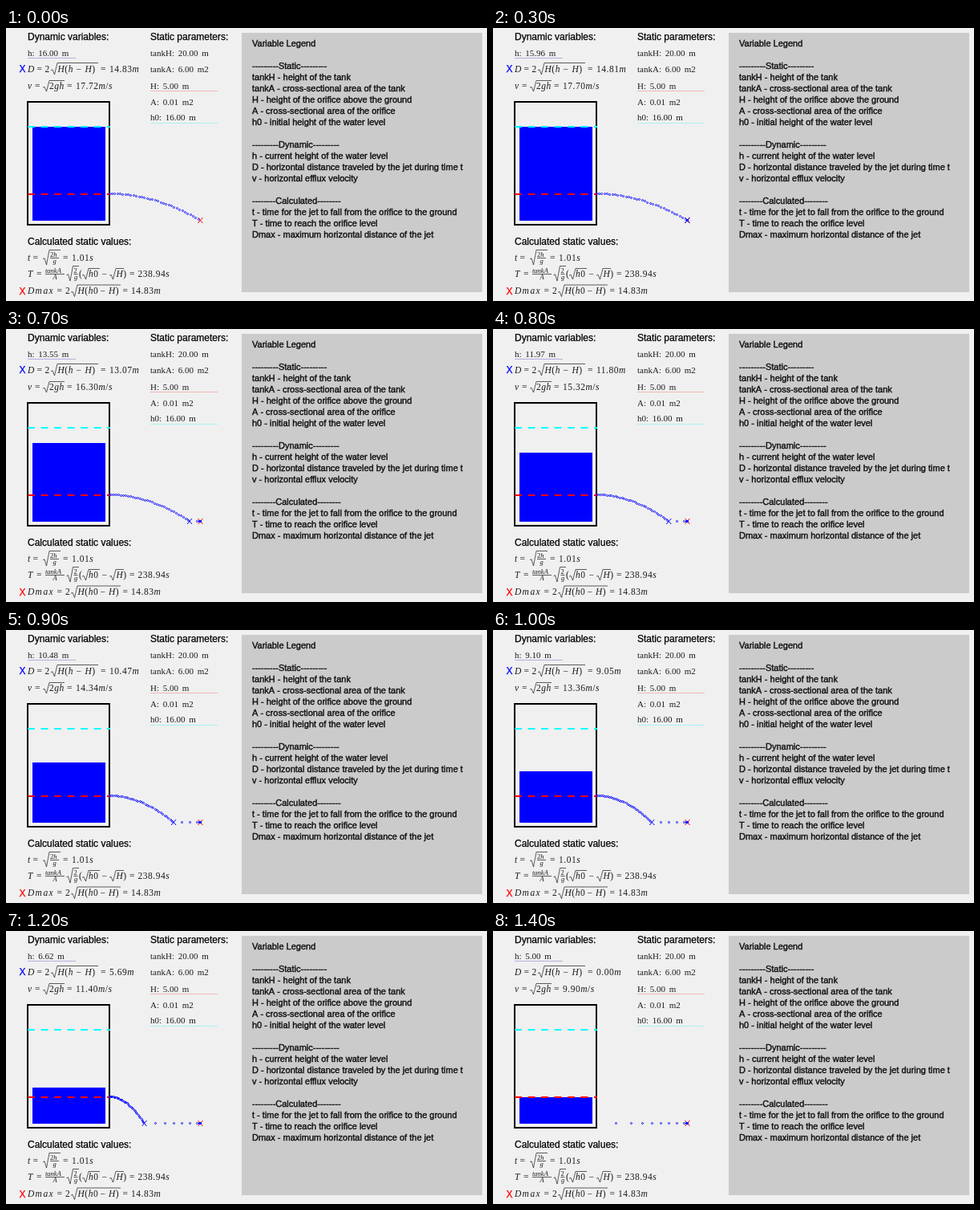
Animation of 600 by 340 pixels, one loop 1.6 s. Source, as an HTML page with a canvas:

```html
<!DOCTYPE html>
<html lang="en">
<head>
<meta charset="utf-8">
<title>Draining tank</title>
<style>
  html, body { margin: 0; width: 100%; height: 100%; overflow: hidden; background: #f0f0f0; }
  canvas { display: block; }
</style>
</head>
<body>
<canvas id="stage" width="600" height="340"></canvas>
<script>
const ctx = document.getElementById('stage').getContext('2d');
const SANS = '"Liberation Sans", Arial, sans-serif';
const SERIF = '"Liberation Serif", "Times New Roman", serif';
const BLUE = '#00f', RED = '#f00', CYAN = '#0ff', INK = '#1c1c1c';

// Physics, in metres and seconds
const G = 9.81, H = 5, H0 = 16, DRAIN_TIME = 238.94;
const STEP = 100, STEPS = 16, LAST = 14;
const drainRate = (Math.sqrt(H0) - Math.sqrt(H)) / DRAIN_TIME;
const FALL_TIME = Math.sqrt(2 * H / G);

// Stage geometry, in pixels
const SCALE = 7.65, GROUND = 245, FLOOR = 239.5, WALL = 129;
const levelY = h => Math.ceil(GROUND - h * SCALE);
const landingX = h => WALL + reach(h) * SCALE;

const LEGEND = `Variable Legend

---------Static---------
tankH - height of the tank
tankA - cross-sectional area of the tank
H - height of the orifice above the ground
A - cross-sectional area of the orifice
h0 - initial height of the water level

---------Dynamic---------
h - current height of the water level
D - horizontal distance traveled by the jet during time t
v - horizontal efflux velocity

--------Calculated--------
t - time for the jet to fall from the orifice to the ground
T - time to reach the orifice level
Dmax - maximum horizontal distance of the jet`.split('\n');

function elapsed(step) {
  if (step < 3) return 0;
  if (step < 6) return step - 2.34;
  return Math.min(DRAIN_TIME, 13.27 + 30 * (step - 6));
}

function level(step) {
  return (Math.sqrt(H0) - drainRate * elapsed(step)) ** 2;
}

function reach(h) {
  return 2 * Math.sqrt(H * Math.max(0, h - H));
}

function text(x, y, str, font, { color = INK, letter = 0, word = 0, weight = 0 } = {}) {
  ctx.font = font;
  ctx.letterSpacing = letter + 'px';
  ctx.wordSpacing = word + 'px';
  ctx.fillStyle = ctx.strokeStyle = color;
  ctx.fillText(str, x, y);
  if (!weight) return;
  ctx.lineWidth = weight;
  ctx.strokeText(str, x, y);
}

const sans = (x, y, str, color = '#000') => text(x, y, str, '12px ' + SANS, { color, weight: 0.25 });
const roman = (x, y, str) => text(x, y, str, '11px ' + SERIF, { word: 2 });

// Letters in italics, everything else upright
function math(x, y, str, size = 11.5, letter = 0.5) {
  for (const run of str.match(/[a-z]+|[^a-z]+/gi)) {
    text(x, y, run, `${/[a-z]/i.test(run) ? 'italic ' : ''}${size}px ${SERIF}`, { letter });
    x += ctx.measureText(run).width;
  }
}

function equation(y, ...parts) {
  for (let i = 0; i < parts.length; i += 2) math(parts[i], y, parts[i + 1]);
}

function line(color, width, ...points) {
  ctx.strokeStyle = color;
  ctx.lineWidth = width;
  ctx.beginPath();
  for (let i = 0; i < points.length; i += 2) ctx.lineTo(points[i], points[i + 1]);
  ctx.stroke();
}

function root(x, right, top, bottom) {
  const mid = (top + bottom) / 2 + 1;
  line(INK, 0.7, x, mid + 1, x + 2, mid, x + 4.5, bottom, x + 8, top, right, top);
}

function fraction(x, right, y, upper, lower, lowerX) {
  math(x, y - 1.5, upper, 8.5, 0);
  line(INK, 0.7, x, y + 0.5, right, y + 0.5);
  math(lowerX, y + 7, lower, 8.5, 0);
}

function cross(x, color) {
  line(color, 1, x - 3, FLOOR - 3.5, x + 3, FLOOR + 3.5);
  line(color, 1, x + 3, FLOOR - 3.5, x - 3, FLOOR + 3.5);
}

// Small ring on the pixel grid
function dot(x, y) {
  ctx.strokeStyle = BLUE;
  ctx.lineWidth = 1;
  ctx.beginPath();
  ctx.arc(Math.floor(x) + 0.5, Math.floor(y) + 0.5, 1, 0, 7);
  ctx.stroke();
}

function dashed(y, color) {
  ctx.setLineDash([9, 7.5]);
  line(color, 2, 27, y, 130, y);
  ctx.setLineDash([]);
}

function drawLabels(h, flowing) {
  sans(27, 15, 'Dynamic variables:');
  roman(27, 34.5, `h: ${h.toFixed(2)} m`);
  line('#b0b0e0', 1, 27, 37.5, 87, 37.5);
  if (flowing) sans(16.5, 55, 'X', BLUE);
  equation(54.5, 27, 'D', 38.5, '=', 48.5, '2', 64.5, 'H(h', 87.5, '−', 98.5, 'H)',
    118, '=', 129, reach(h).toFixed(2) + 'm');
  root(56, 115, 43.5, 58);
  equation(75.5, 27, 'v', 36, '=', 54, '2gh', 76, '=', 87, Math.sqrt(2 * G * h).toFixed(2) + 'm/s');
  root(46, 73, 65.5, 79);

  sans(180, 15, 'Static parameters:');
  roman(180, 34.5, 'tankH: 20.00 m');
  roman(180, 54.5, 'tankA: 6.00 m2');
  roman(180, 75.5, 'H: 5.00 m');
  roman(180, 95.5, 'A: 0.01 m2');
  roman(180, 115, 'h0: 16.00 m');
  line('#f4b4b4', 1, 180, 78.5, 264, 78.5);
  line('#a8f2f2', 1, 180, 118.5, 264, 118.5);

  sans(27, 270, 'Calculated static values:');
  equation(290, 27, 't', 33.5, '=', 71, '=', 82, '1.01s');
  fraction(55, 66, 286, '2h', 'g', 58.5);
  root(46, 68, 276.5, 295);
  equation(310, 27, 'T', 38, '=', 91, '(', 103, 'h0', 119.5, '−', 137.5, 'H)', 154, '=', 164.5, '238.94s');
  fraction(49, 73, 306, 'tankA', 'A', 58.5);
  fraction(84.5, 89.5, 306, '2', 'g', 85);
  root(75.5, 91, 296.5, 315);
  root(95, 117, 299.5, 313);
  root(129, 147, 299.5, 313);
  sans(16.5, 332, 'X', RED);
  equation(331, 27, 'D', 36.5, 'm', 46.5, 'a', 53.5, 'x', 63.5, '=', 74, '2', 89.5, 'H(h0',
    117.5, '−', 128, 'H)', 145.5, '=', 156, '14.83m');
  root(81, 143, 320, 334.5);
}

function drawLegend() {
  ctx.fillStyle = '#cbcbcb';
  ctx.fillRect(294, 6, 300, 323);
  LEGEND.forEach((row, i) =>
    text(307, 23 + 14 * i, row, '11px ' + SANS, { color: '#111', weight: 0.4 }));
}

function drawTank(h) {
  ctx.fillStyle = BLUE;
  ctx.fillRect(33, levelY(h), 91, 240 - levelY(h));
  ctx.strokeStyle = '#000';
  ctx.lineWidth = 2;
  ctx.strokeRect(27, 92, 102, 153);
  dashed(levelY(H0), CYAN);
  dashed(levelY(H), RED);
}

function drawJet(step, h) {
  cross(landingX(H0), RED);
  for (let i = 0; i < step; i++) dot(landingX(level(i)), FLOOR);
  if (step >= LAST) return;
  for (let t = 0; t <= FALL_TIME; t += 0.03) {
    const part = t / FALL_TIME;
    dot(WALL + (landingX(h) - WALL) * part, 206.5 + (FLOOR - 206.5) * part * part);
  }
  if (step > 0) cross(landingX(h), BLUE);
}

function draw() {
  const step = Math.min(LAST, Math.floor(performance.now() / STEP) % STEPS);
  const h = level(step);
  ctx.fillStyle = '#f0f0f0';
  ctx.fillRect(0, 0, 600, 340);
  drawLabels(h, step < LAST);
  drawLegend();
  drawTank(h);
  drawJet(step, h);
  requestAnimationFrame(draw);
}
draw();
</script>
</body>
</html>
```
